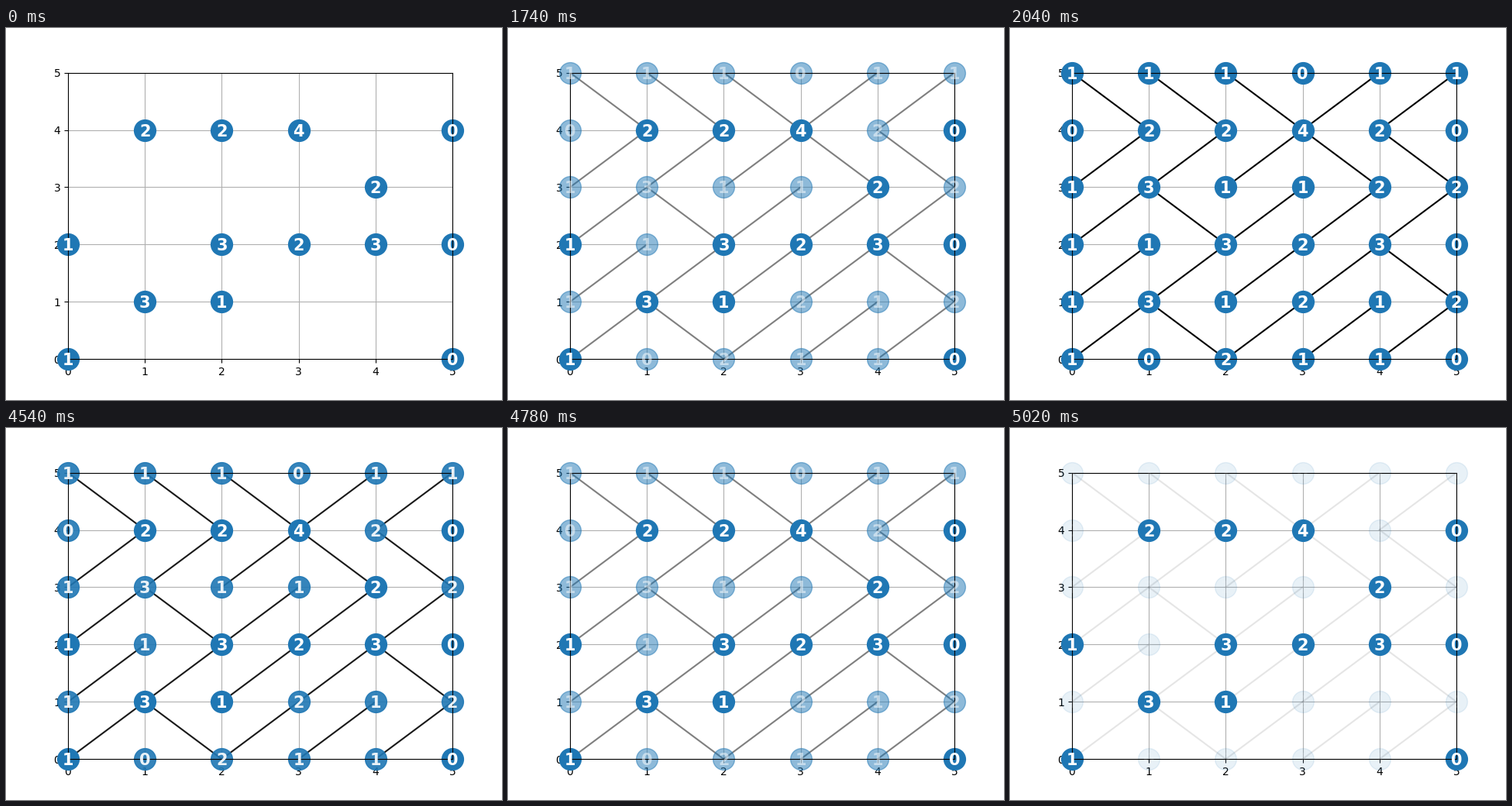
A matplotlib script for the animation above (5080 ms loop, 640 by 480 pixels).

```python
import numpy as np
import matplotlib.pyplot as plt
from matplotlib.animation import FuncAnimation

STEP = 20          # ms per frame
FRAMES = 254
FADE_IN, FADE_OUT = 1500, 4540
LEVEL = 60         # ms per opacity level

# Slanted walls, bottom row first
ROWS = ["/\\///", "////\\", "/\\///", "///\\\\", "\\\\\\//"]
CLUES = {(0, 0), (5, 0), (1, 1), (2, 1), (0, 2), (2, 2), (3, 2),
         (4, 2), (5, 2), (4, 3), (1, 4), (2, 4), (3, 4), (5, 4)}
N = len(ROWS)

plt.rcParams["font.family"] = "DejaVu Sans"
fig, ax = plt.subplots(figsize=(6.4, 4.8), dpi=100)
ax.set_xlim(0, N)
ax.set_ylim(0, N)
ax.set_xticks(range(N + 1))
ax.set_yticks(range(N + 1))
ax.grid(True)

walls = []
degree = np.zeros((N + 1, N + 1), int)
for y, row in enumerate(ROWS):
    for x, slant in enumerate(row):
        ya, yb = (y, y + 1) if slant == "/" else (y + 1, y)
        walls += ax.plot([x, x + 1], [ya, yb], color="black", lw=1.5)
        degree[x, ya] += 1
        degree[x + 1, yb] += 1


def draw_nodes(points):
    """Draw numbered discs and return their artists."""
    xs, ys = zip(*points)
    discs = ax.plot(xs, ys, "o", color="C0", ms=20, clip_on=False)
    labels = [ax.text(x, y, str(degree[x, y]), color="white", size=15,
                      weight="bold", ha="center", va="center_baseline")
              for x, y in points]
    return discs + labels


nodes = [(x, y) for x in range(N + 1) for y in range(N + 1)]
draw_nodes([p for p in nodes if p in CLUES])
solution = walls + draw_nodes([p for p in nodes if p not in CLUES])


def level(t, start):
    """Opacity steps passed since start, from 0 to 10."""
    return min(10, max(0, (t - start) // LEVEL + 1))


def update(i):
    t = i * STEP
    alpha = (level(t, FADE_IN) - level(t, FADE_OUT)) / 10
    for artist in solution:
        artist.set_alpha(alpha)
        artist.set_visible(alpha > 0)
    return solution


anim = FuncAnimation(fig, update, frames=FRAMES, interval=STEP,
                     repeat=True, repeat_delay=0, blit=False)
plt.show()
```
